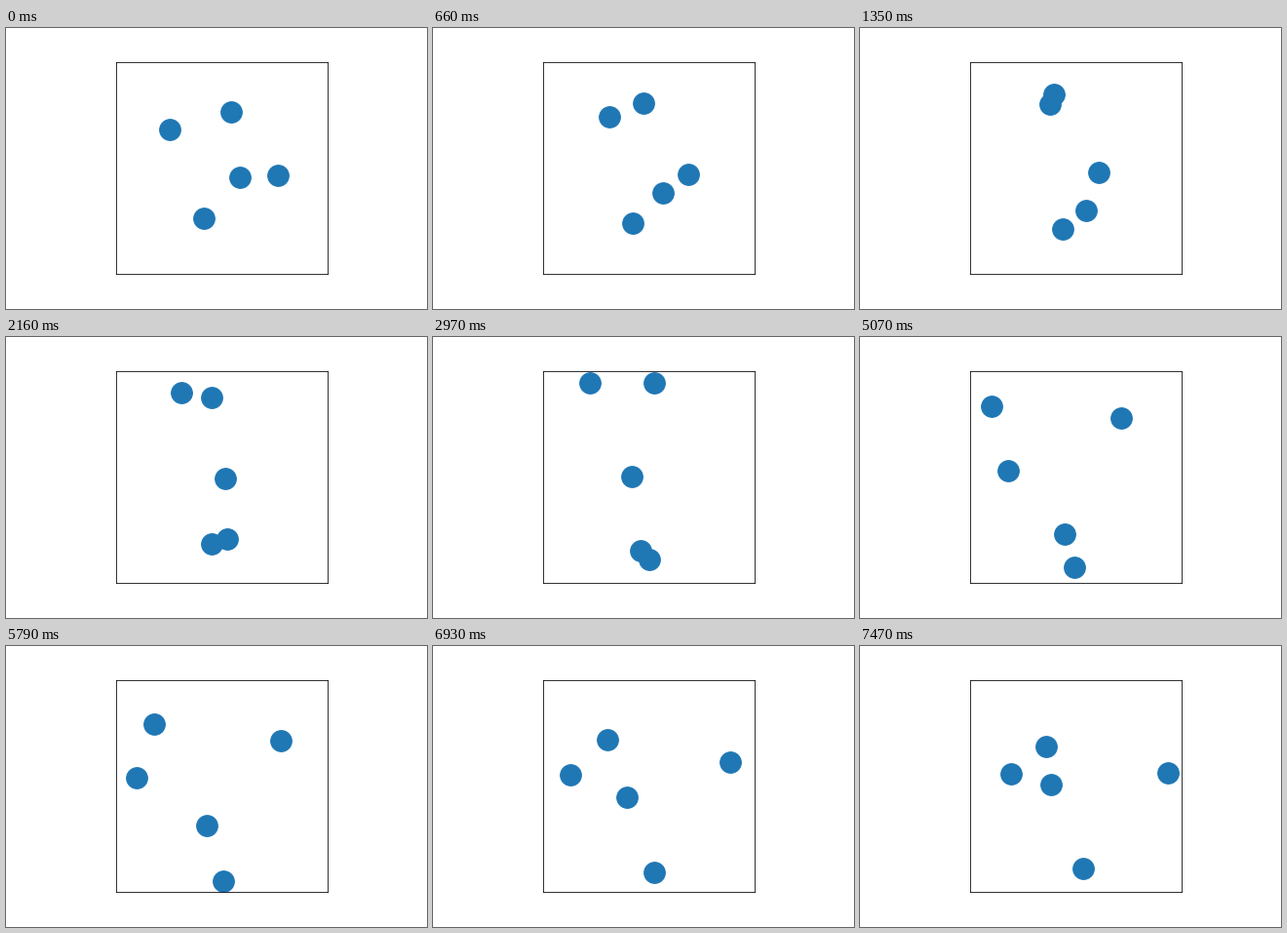
Recreate the animation shown at these times as a matplotlib script. Size 432x288 px, loop 7.5 s.

```python
import numpy as np
import matplotlib.pyplot as plt
from matplotlib.animation import FuncAnimation

W, H, DPI = 432, 288, 72
FRAMES, INTERVAL = 250, 30
LEFT, TOP, SIDE = 112.9, 34.6, 217  # the box, in pixels
WALL = 0.047  # how near a centre comes to a wall, in box widths


def bounce(p):
    """Fold a straight path back and forth between the walls."""
    span = 1 - 2 * WALL
    return WALL + span - np.abs((p - WALL) % (2 * span) - span)


def glide(start, travel):
    """Path of one ball: start point plus travel per loop."""
    start, travel = np.array(start), np.array(travel)
    return lambda t: bounce(start + travel * t)


paths = [
    glide((0.253, 0.679), (0.684, 0.669)),
    glide((0.545, 0.762), (-0.816, 0.460)),
    glide((0.584, 0.456), (-0.202, -0.872)),
    glide((0.764, 0.462), (-0.866, 0.095)),
    glide((0.416, 0.262), (0.118, -0.279)),
]

fig = plt.figure(figsize=(W / DPI, H / DPI), dpi=DPI, facecolor="white")
ax = fig.add_axes([LEFT / W, 1 - (TOP + SIDE) / H, SIDE / W, SIDE / H])
ax.set(xlim=(0, 1), ylim=(0, 1), xticks=[], yticks=[])
balls, = ax.plot([], [], "o", color="#1f77b4", ms=0.1 * SIDE)


def update(frame):
    t = frame / FRAMES
    balls.set_data(*zip(*(path(t) for path in paths)))
    return balls,


anim = FuncAnimation(fig, update, frames=FRAMES, interval=INTERVAL,
                     repeat=True, repeat_delay=0)
plt.show()
```
